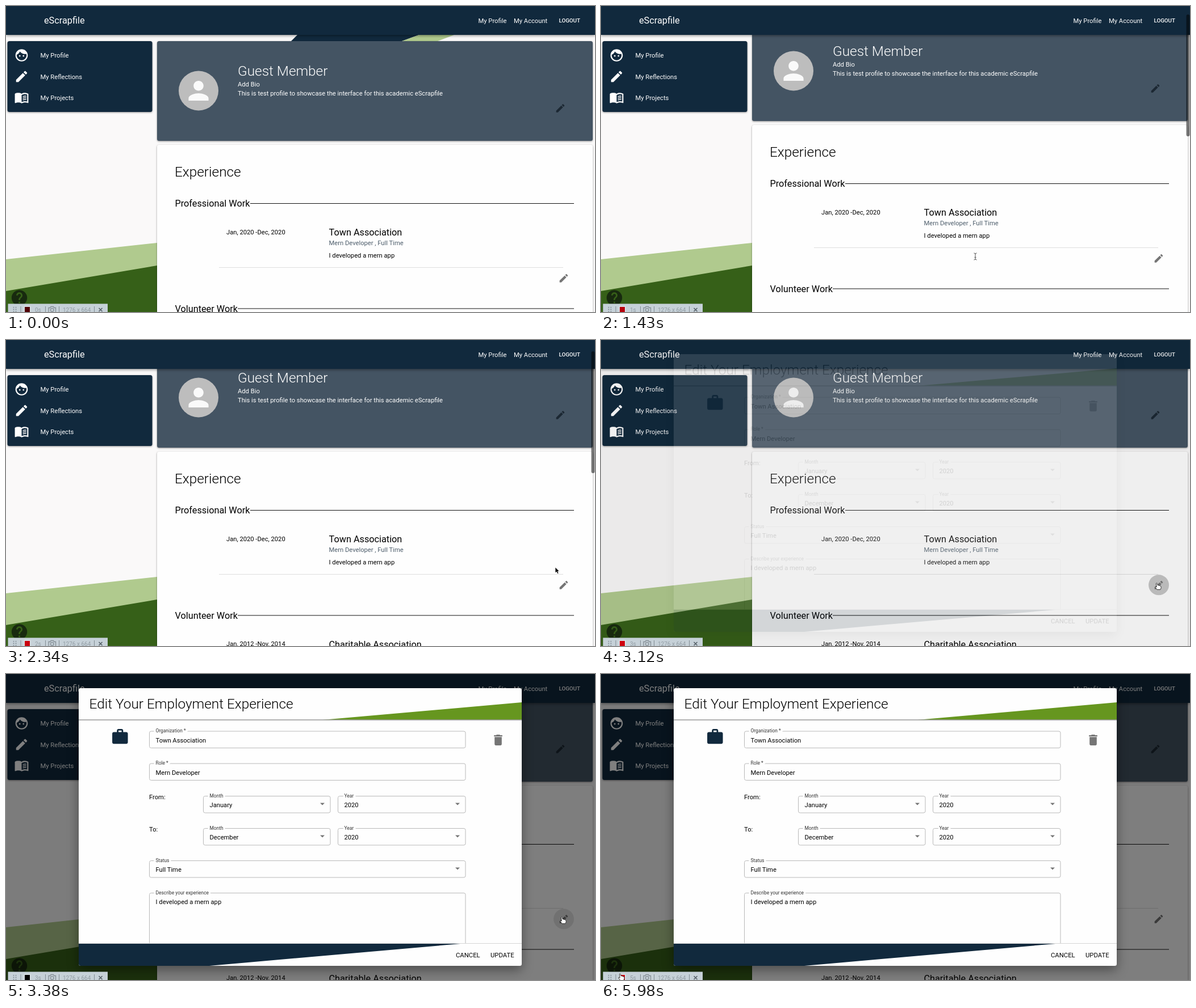
Recreate the animation shown at these times as an HTML page. Size 1037 px wide and 540 px high, loop 6110 ms.

```html
<!DOCTYPE html>
<html lang="en">
<head>
<meta charset="utf-8">
<title>Profile editor</title>
<style>
  html, body { margin: 0; width: 100%; height: 100%; overflow: hidden; background: #faf9f9; }
  svg { display: block; width: 100vw; height: 100vh; }
  text { font: 11.2px Roboto, sans-serif; white-space: pre; }
  .title { font-size: 16.25px; }
  .display { font-size: 24.38px; font-weight: 300; }
  .button { font-size: 11.3px; }
  .label { font-size: 8.4px; fill: #333; stroke: #fefefe; stroke-width: 7px; paint-order: stroke; }
  .white { fill: #fff; }
  .navy { fill: #11293d; }
  .grey { fill: #757575; }
  .box { fill: none; stroke: #b9b9b9; }
  .raised { filter: drop-shadow(0 1px 1.5px rgba(0,0,0,.4)); }
  .bar text { font-size: 10px; fill: #929da4; }
</style>
</head>
<body>
<svg viewBox="0 0 1037 540" xmlns="http://www.w3.org/2000/svg">
  <defs>
    <path id="face" d="M9 11.75c-.69 0-1.25.56-1.25 1.25s.56 1.25 1.25 1.25 1.25-.56 1.25-1.25-.56-1.25-1.25-1.25zm6 0c-.69 0-1.25.56-1.25 1.25s.56 1.25 1.25 1.25 1.25-.56 1.25-1.25-.56-1.25-1.25-1.25zM12 2C6.48 2 2 6.48 2 12s4.48 10 10 10 10-4.48 10-10S17.52 2 12 2zm0 18c-4.41 0-8-3.59-8-8 0-.29.02-.58.05-.86 2.36-1.05 4.23-2.98 5.21-5.37C11.07 8.33 14.05 10 17.42 10c.78 0 1.53-.09 2.25-.26.21.71.33 1.47.33 2.26 0 4.41-3.59 8-8 8z"/>
    <path id="pencil" d="M3 17.25V21h3.75L17.81 9.94l-3.75-3.75L3 17.25zM20.71 7.04c.39-.39.39-1.02 0-1.41l-2.34-2.34c-.39-.39-1.02-.39-1.41 0l-1.83 1.83 3.75 3.75 1.83-1.83z"/>
    <g id="book">
      <path d="M21 5c-1.11-.35-2.33-.5-3.5-.5-1.95 0-4.05.4-5.5 1.5-1.45-1.1-3.55-1.5-5.5-1.5S2.45 4.9 1 6v14.65c0 .25.25.5.5.5.1 0 .15-.05.25-.05C3.1 20.45 5.05 20 6.5 20c1.95 0 4.05.4 5.5 1.5 1.35-.85 3.8-1.5 5.5-1.5 1.65 0 3.35.3 4.75 1.05.1.05.15.05.25.05.25 0 .5-.25.5-.5V6c-.6-.45-1.25-.75-2-1zm0 13.5c-1.1-.35-2.3-.5-3.5-.5-1.7 0-4.15.65-5.5 1.5V8c1.35-.85 3.8-1.5 5.5-1.5 1.2 0 2.4.15 3.5.5v11.5z"/>
      <path d="M14 10.5q3-1.1 5.5-.6M14 13.2q3-1.1 5.5-.6M14 15.9q3-1.1 5.5-.6" fill="none" stroke="#fff" stroke-width="1.4"/>
    </g>
    <path id="person" d="M12 12c2.21 0 4-1.79 4-4s-1.79-4-4-4-4 1.79-4 4 1.79 4 4 4zm0 2c-2.67 0-8 1.34-8 4v2h16v-2c0-2.66-5.33-4-8-4z"/>
    <path id="help" d="M12 2C6.48 2 2 6.48 2 12s4.48 10 10 10 10-4.48 10-10S17.52 2 12 2zm1 17h-2v-2h2v2zm2.07-7.75l-.9.92C13.45 12.9 13 13.5 13 15h-2v-.5c0-1.1.45-2.1 1.17-2.83l1.24-1.26c.37-.36.59-.86.59-1.41 0-1.1-.9-2-2-2s-2 .9-2 2H8c0-2.21 1.79-4 4-4s4 1.79 4 4c0 .88-.36 1.68-.93 2.25z"/>
    <path id="briefcase" d="M20 6h-4V4c0-1.11-.89-2-2-2h-4c-1.11 0-2 .89-2 2v2H4c-1.11 0-1.99.89-1.99 2L2 19c0 1.11.89 2 2 2h16c1.11 0 2-.89 2-2V8c0-1.11-.89-2-2-2zm-6 0h-4V4h4v2z"/>
    <path id="trash" d="M6 19c0 1.1.9 2 2 2h8c1.1 0 2-.9 2-2V7H6v12zM19 4h-3.5l-1-1h-5l-1 1H5v2h14V4z"/>
    <clipPath id="formArea"><rect x="128" y="82" width="780" height="393.5"/></clipPath>
  </defs>

  <rect width="1037" height="540" fill="#faf9f9"/>
  <path d="M0 447L266 418V540H0z" fill="#b0ca8e"/>
  <path d="M0 503L266 458V540H0z" fill="#366018"/>
  <path d="M513 51H727L697 62H502z" class="navy"/>
  <path d="M727 51H789L760 62H697z" fill="#b0ca8e"/>

  <g id="page">
    <rect x="266" y="62" width="767" height="176" rx="3.5" fill="#445463" class="raised"/>
    <circle cx="339" cy="149.5" r="35" fill="#bdbdbd"/>
    <use href="#person" transform="translate(312.6 123.1) scale(2.2)" fill="#fafafa"/>
    <text x="408" y="123" class="display white">Guest Member</text>
    <text x="408" y="142" class="white">Add Bio</text>
    <text x="408" y="158" class="white">This is test profile to showcase the interface for this academic eScrapfile</text>
    <use href="#pencil" transform="translate(966.2 170.7) scale(.813)" fill="#1c2833"/>
    <rect x="266" y="245" width="767" height="700" rx="3.5" fill="#fefefe" class="raised"/>
    <text x="297" y="300.5" class="display">Experience</text>
    <text x="297.5" y="354" class="title">Professional Work</text>
    <path d="M430 348.5H1000M408 534H1000" stroke="#111"/>
    <text x="388" y="402.5">Jan, 2020 -Dec, 2020</text>
    <text x="568.5" y="405" class="title">Town Association</text>
    <text x="568.5" y="421.5" fill="#4d5d6b">Mern Developer , Full Time</text>
    <text x="568.5" y="444">I developed a mern app</text>
    <path d="M375 461.5H981" stroke="#dedede"/>
    <circle id="ripple" cx="982" cy="480.3" r="18"/>
    <use href="#pencil" transform="translate(972.2 470.6) scale(.813)" class="grey"/>
    <text x="297.5" y="539.5" class="title">Volunteer Work</text>
    <text x="388" y="588">Jan, 2012 -Nov, 2014</text>
    <text x="568.5" y="590.5" class="title">Charitable Association</text>
  </g>

  <rect x="2.5" y="62" width="255" height="125" rx="3.5" class="navy raised"/>
  <g class="white">
    <use href="#face" transform="translate(14.5 74) scale(1.083)"/>
    <use href="#pencil" transform="translate(14.5 111.5) scale(1.083)"/>
    <use href="#book" transform="translate(14.5 148.5) scale(1.083)"/>
    <text x="60.5" y="91">My Profile</text>
    <text x="60.5" y="128.5">My Reflections</text>
    <text x="60.5" y="166">My Projects</text>
  </g>
  <use href="#help" transform="translate(7.1 498.5) scale(1.37)" fill="#182a0f"/>

  <rect width="1037" height="51" class="navy" style="filter:drop-shadow(0 2px 2px rgba(0,0,0,.35))"/>
  <g class="white">
    <text x="67" y="31" class="title">eScrapfile</text>
    <text x="831.5" y="29.5">My Profile</text>
    <text x="894" y="29.5">My Account</text>
    <text x="973.5" y="29" style="font-size:9.75px;font-weight:500">LOGOUT</text>
  </g>
  <rect id="scrollbar" x="1030.5" width="6" height="215" rx="3" fill="#000" fill-opacity=".52"/>

  <rect id="backdrop" width="1037" height="540"/>
  <g id="dialog">
    <rect x="128" y="25" width="780" height="490" rx="3.5" fill="#fefefe" style="filter:drop-shadow(0 7px 10px rgba(0,0,0,.4))"/>
    <path d="M557 81L908 50V81z" fill="#66961f"/>
    <path d="M128 81H908" stroke="#999" stroke-width="1.5"/>
    <text x="146.5" y="61" class="display">Edit Your Employment Experience</text>
    <use href="#briefcase" transform="translate(184.3 94.3) scale(1.375)" class="navy"/>
    <use href="#trash" transform="translate(853.9 103.9) scale(1.05)" class="grey"/>
    <text x="252" y="221">From:</text>
    <text x="252" y="278">To:</text>
    <g id="fields" clip-path="url(#formArea)"></g>
    <path d="M128 475.5H908" stroke="#d5d5d5"/>
    <path d="M128 476H800L358 515H131.5Q128 515 128 511.5z" class="navy"/>
    <text x="792" y="499.5" class="button">CANCEL</text>
    <text x="853" y="499.5" class="button">UPDATE</text>
  </g>

  <g class="bar">
    <rect x="3.5" y="525.5" width="175.5" height="15" fill="#c6d1d8"/>
    <path d="M13.5 531V541M17.5 531V541" stroke="#77828a" stroke-width="1.6" stroke-dasharray="1.6 2"/>
    <path d="M26 530V540M69.5 530V540M93.5 530V540M155.5 530V540" stroke="#828d94"/>
    <rect x="31.5" y="529.5" width="12" height="12" fill="#dce3e7"/>
    <rect id="record" x="33" y="531" width="9" height="10"/>
    <text id="seconds" x="51" y="539.5"></text>
    <path d="M75 532.5H78L79 530.5H83.5L84.5 532.5H87.5V541H75z" fill="none" stroke="#858f96" stroke-width="1.3"/>
    <circle cx="81.2" cy="536.5" r="2.8" fill="none" stroke="#858f96" stroke-width="1.3"/>
    <text x="100" y="539.5">1276 x 664</text>
    <path d="M163.5 533L169.5 539M169.5 533L163.5 539" stroke="#59646b" stroke-width="1.7"/>
  </g>

  <g id="cursor">
    <path id="arrow" d="M0 0V10L2.3 8L4 11.5L5.9 10.6L4.3 7.2H7.3z" fill="#000" stroke="#fff" stroke-width=".7"/>
    <path id="beam" d="M-2.5 -6Q0 -6 0 -4Q0 -6 2.5 -6M0 -4V4M-2.5 6Q0 6 0 4Q0 6 2.5 6M-1.5 1.5H1.5" fill="none" stroke="#555"/>
    <path id="hand" d="M-2.6 -4.5Q-1.5 -6 -.6 -4.3L.3 -1Q1.5 -1.8 2.2 -.7Q3.5 -1.3 4.1 0Q5.8 -.2 6 1.3V3.8L4.8 6.5H-1L-4 2.8Q-4.6 1.2 -3 1.2L-1.8 2.2z" fill="#fff" stroke="#222" stroke-width=".9"/>
  </g>
</svg>
<script>
const FRAME = 130, LOOP = 6110, SECOND = 1040;
const el = id => document.getElementById(id);

// Outlined form fields: label, value, x, top, width, has a drop-down arrow
const field = (label, value, x, top, width, arrow, height = 29.5) => `
  <rect class="box" x="${x}" y="${top}" width="${width}" height="${height}" rx="3"/>
  <text class="label" x="${x + 11}" y="${top + 2}">${label}</text>
  <text x="${x + 11}" y="${top + 19.5}">${value}</text>
  ${arrow ? `<path class="grey" d="M${x + width - 18} ${top + 12}h8l-4 4z"/>` : ''}`;

el('fields').innerHTML = [
  field('Organization *', 'Town Association', 252.5, 101, 556.5),
  field('Role *', 'Mern Developer', 252.5, 158, 556.5),
  field('Month', 'January', 347.5, 215.5, 223.5, true),
  field('Year', '2020', 584.5, 215.5, 224.5, true),
  field('Month', 'December', 347.5, 272.5, 223.5, true),
  field('Year', '2020', 584.5, 272.5, 224.5, true),
  field('Status', 'Full Time', 252.5, 329.5, 556.5, true),
  field('Describe your experience', 'I developed a mern app', 252.5, 386.5, 556.5, false, 120),
].join('');

// Keys are [time, value]; linear in between and held at both ends
function tween(keys, t) {
  if (t <= keys[0][0]) return keys[0][1];
  for (let i = 1; i < keys.length; i++) {
    const [t0, a] = keys[i - 1], [t1, b] = keys[i];
    if (t <= t1) return a + (b - a) * (t - t0) / (t1 - t0);
  }
  return keys[keys.length - 1][1];
}

const scrollKeys = [[1170, 0], [1300, 12], [1430, 35], [1560, 46], [1690, 46], [1820, 48]];
const scrollbarKeys = [[1170, 0], [1300, 1], [2470, 1], [2730, 0]];
const dialogKeys = [[2990, 0], [3120, .12], [3250, .86], [3380, 1]];
const rippleKeys = [[2470, 0], [2730, .05], [2990, .08], [3120, .22], [3250, .24], [3380, .1], [3510, 0]];
const recordKeys = [[0, .35], [130, 0], [390, .4], [520, .85], [1300, .85], [1430, .8], [1560, .3],
  [1690, .3], [1950, .9], [2340, .88], [2600, 0], [2860, .5], [2990, .9], [3120, .9], [3250, .65],
  [3380, 0], [4420, 0], [4680, .9], [4940, .98], [5070, .95], [5330, 0], [5720, .9]];
const cursorX = [[390, 37], [780, 640], [1300, 659], [1820, 659], [2340, 967], [2730, 980],
  [4420, 980], [4940, 667], [5200, 667], [5720, 35]];
const cursorY = [[390, 534], [780, 470], [1300, 442], [1820, 442], [2340, 401], [2730, 434],
  [4420, 434], [4940, 497.5], [5200, 497.5], [5720, 534]];

function cursorShape(t) {
  if (t < 390) return '';
  if (t >= 780 && t < 1950) return 'beam';
  if ((t >= 2600 && t < 3510) || t >= 5590) return 'hand';
  return 'arrow';
}

function draw(t) {
  const scroll = tween(scrollKeys, t), open = tween(dialogKeys, t), red = tween(recordKeys, t);
  el('page').setAttribute('transform', `translate(0 ${-scroll})`);
  el('scrollbar').setAttribute('y', 1.5 + .385 * scroll);
  el('scrollbar').setAttribute('opacity', tween(scrollbarKeys, t));
  el('ripple').setAttribute('opacity', tween(rippleKeys, t));
  el('backdrop').setAttribute('opacity', .5 * open);
  el('dialog').setAttribute('opacity', open);
  el('record').setAttribute('fill', `rgb(${Math.round(230 * red)},0,${Math.round(16 * red)})`);
  el('seconds').textContent = Math.floor(t / SECOND) + 's';
  el('cursor').setAttribute('transform', `translate(${tween(cursorX, t)} ${tween(cursorY, t)})`);
  for (const shape of ['arrow', 'beam', 'hand'])
    el(shape).setAttribute('visibility', shape === cursorShape(t) ? 'visible' : 'hidden');
}

const start = performance.now();
function tick() {
  const t = (performance.now() - start) % LOOP;
  draw(Math.floor(t / FRAME) * FRAME);
  requestAnimationFrame(tick);
}
tick();
</script>
</body>
</html>
```
